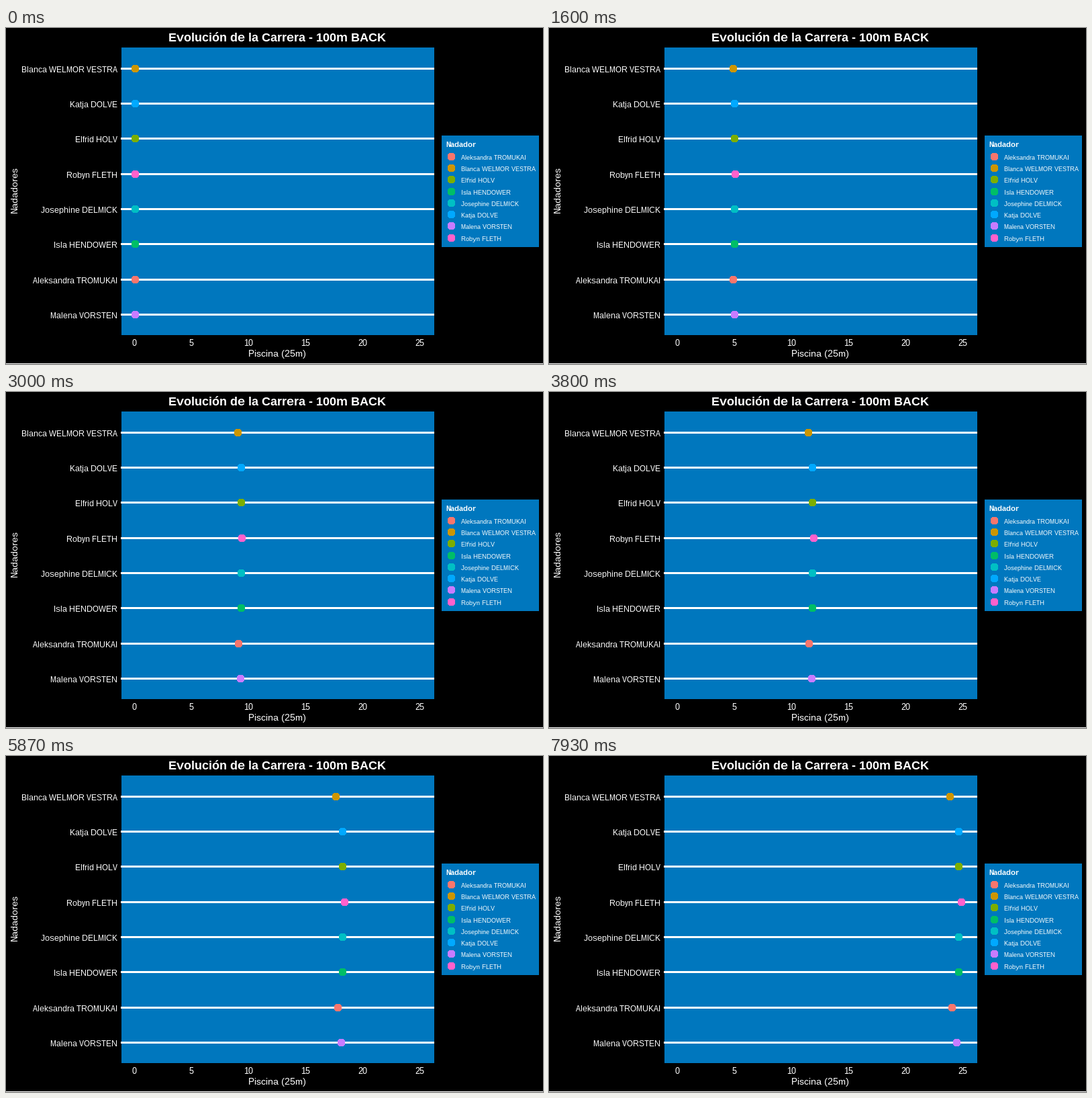
Animation of 800x500 px, one loop 8 s. Source, as a matplotlib script:

```python
import math

import matplotlib.pyplot as plt
from matplotlib.animation import FuncAnimation
from matplotlib.patches import Circle, Rectangle

plt.rcParams.update({
    "font.family": "Liberation Sans",
    "text.hinting": "native",
    "text.hinting_factor": 1,
    "toolbar": "None",
})

W, H, DPI = 800, 500, 100
STEPS, LOOP_MS, TICK_MS = 120, 8000, 20
LEAD_MS = 14  # a step shows in the tick closest to its due time
POOL = "#0077BE"
START_X, DOT = 187.4, 11

# Legend order: name, colour, lane (from the top), speed in px per step
SWIMMERS = [
    ("Aleksandra TROMUKAI", "#F8766D", 6, 3.4285),
    ("Blanca WELMOR VESTRA", "#CD9600", 0, 3.4017),
    ("Elfrid HOLV", "#7CAE00", 2, 3.512),
    ("Isla HENDOWER", "#00BE67", 5, 3.512),
    ("Josephine DELMICK", "#00BFC4", 4, 3.512),
    ("Katja DOLVE", "#00A9FF", 1, 3.512),
    ("Malena VORSTEN", "#C77CFF", 7, 3.485),
    ("Robyn FLETH", "#FF61CC", 3, 3.5433),
]

fig = plt.figure(figsize=(W / DPI, H / DPI), dpi=DPI, facecolor="black")
ax = fig.add_axes([0, 0, 1, 1])
ax.set_xlim(0, W)
ax.set_ylim(H, 0)
ax.axis("off")


def box(x0, y0, x1, y1, color):
    ax.add_patch(Rectangle((x0, y0), x1 - x0, y1 - y0, fc=color, lw=0,
                           antialiased=False))


def label(x, y, text, px, ha="left", **kw):
    ax.text(x, y, text, fontsize=px * 72 / DPI, color="white", ha=ha,
            va="baseline", **kw)


def dot(x, y, color):
    return ax.add_patch(Circle((x, y), DOT / 2, fc=color, lw=0, zorder=3,
                               antialiased=False))


def lane_y(lane):
    return math.floor(60.3 + 52.3 * lane) + 0.5


def dot_x(speed, step):
    return math.floor(START_X + speed * step) + DOT / 2


# Pool, axes and titles
box(0, 499, W, H, "white")
box(172, 29, 638, 457, POOL)
label(404, 20, "Evolución de la Carrera - 100m BACK", 18, "center",
      weight="bold")
label(404, 489, "Piscina (25m)", 14, "center")
label(17, 240.5, "Nadadores", 14.3, "center", rotation=90,
      rotation_mode="anchor")
for i in range(6):
    label(191.2 + 85.1 * i, 473, str(5 * i), 13, "center")

# Lanes, swimmers and legend
box(649, 160, 794, 326, POOL)
label(655, 177, "Nadador", 11, weight="bold")
dots = []
for i, (name, color, lane, speed) in enumerate(SWIMMERS):
    y = lane_y(lane)
    box(171, y - 1.5, 638, y + 1.5, "white")
    label(166, y + 5.5, name, 12, "right")
    dots.append(dot(dot_x(speed, 0), y, color))

    key_y = math.floor(191.3 + 17.28 * i) + 0.5
    dot(663.5, key_y, color)
    label(678, key_y + 4.5, name, 9.3)


def update(tick):
    step = (tick * TICK_MS + LEAD_MS) * STEPS // LOOP_MS
    for patch, (_, _, lane, speed) in zip(dots, SWIMMERS):
        patch.center = dot_x(speed, step), lane_y(lane)
    return dots


anim = FuncAnimation(fig, update, frames=LOOP_MS // TICK_MS,
                     interval=TICK_MS, repeat=True, repeat_delay=0,
                     cache_frame_data=False)
plt.show()
```
